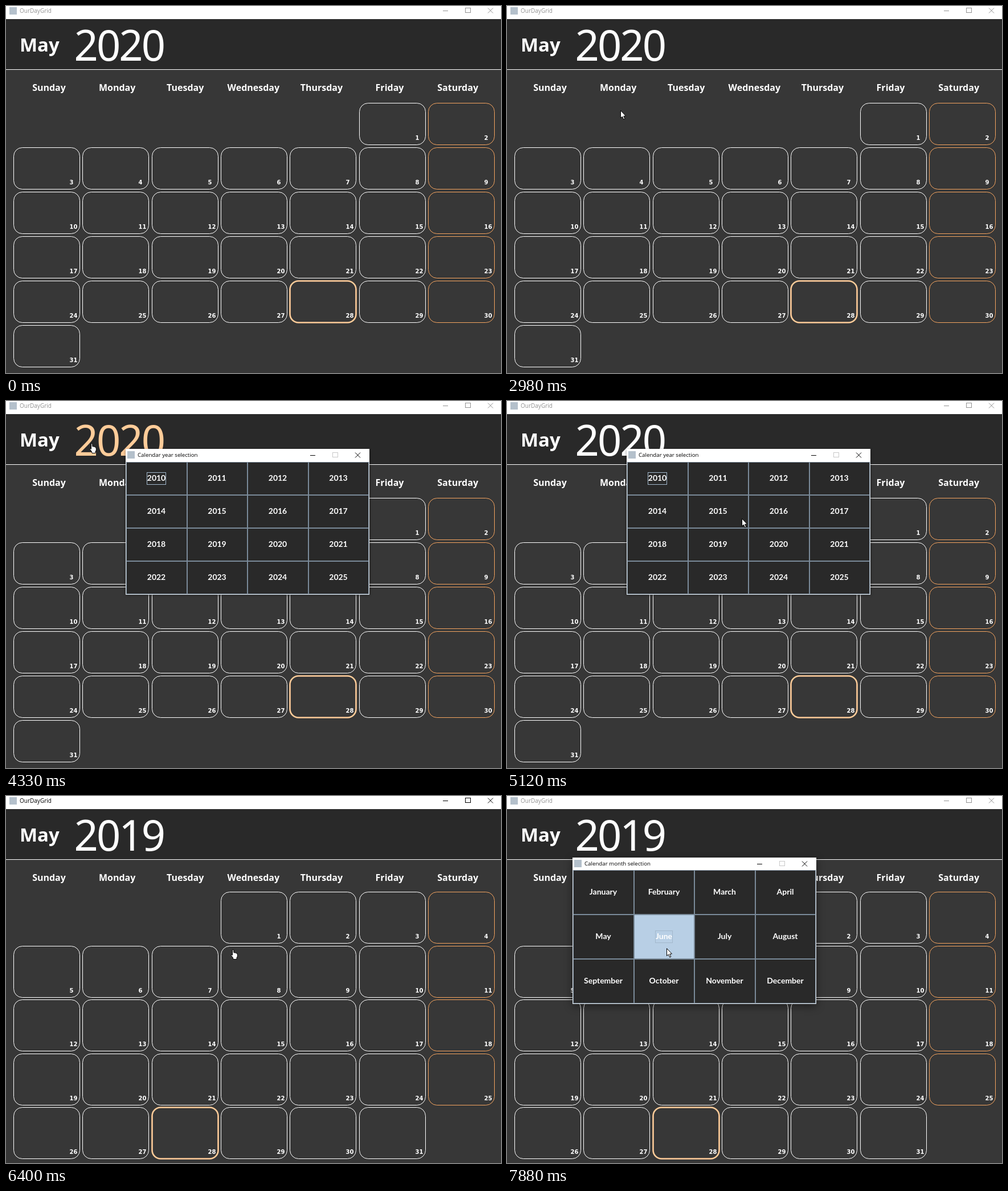
These frames come from a looping animation (869x644 px, 8 s). An HTML page with a canvas:

```html
<!DOCTYPE html>
<html lang="en">
<head>
<meta charset="utf-8">
<title>OurDayGrid</title>
<style>
html, body { margin: 0; width: 100%; height: 100%; overflow: hidden; background: #373737; }
canvas { display: block; }
</style>
</head>
<body>
<canvas id="stage" width="869" height="644"></canvas>
<script>
const ctx = document.getElementById('stage').getContext('2d');
const LOOP = 8000;
const DARK = '#292929', BODY = '#373737', PEACH = '#ffcc99', SAND = '#f4a460';
const STEEL = '#7a8a99', PRESSED = '#b8cfe5', FOCUS = '#a3b8cc', IDLE = '#929292';
const HEAD = '"Noto Sans", "Open Sans", sans-serif';
const UI = '"Open Sans", "Noto Sans", sans-serif';
const DAYS = ['Sunday', 'Monday', 'Tuesday', 'Wednesday', 'Thursday', 'Friday', 'Saturday'];
const MONTHS = ['January', 'February', 'March', 'April', 'May', 'June', 'July', 'August',
  'September', 'October', 'November', 'December'];
const YEARS = Array.from({ length: 16 }, (_, i) => String(2010 + i));

// start, end, steps, target x, target y
const MOVES = [
  [1090, 1140, 2, 706, 640],
  [1600, 1830, 6, 393, 334],
  [2520, 3310, 16, 66, 80],
  [3360, 3870, 11, 146, 69],
  [3900, 4150, 5, 148, 73],
  [4330, 5120, 18, 412, 206],
  [5170, 5810, 13, 407, 274],
  [6400, 6850, 10, 73, 86],
  [7240, 7830, 12, 280, 267]
];

const YEAR_DLG = {
  x: 210, y: 84, top: 107, rowH: 58, h: 256, title: 'Calendar year selection', items: YEARS,
  open: 3950, shown: 4150, close: 5990, gone: 6170, press: 5760, first: 0, pick: 9, blur: 5
};
const MONTH_DLG = {
  x: 115, y: 108, top: 130, rowH: 78, h: 257, title: 'Calendar month selection', items: MONTHS,
  open: 6980, shown: 7190, close: 9000, gone: 9200, press: 7840, first: 4, pick: 5, blur: 14
};
const DIALOGS = [YEAR_DLG, MONTH_DLG];
const DLG_W = 428, COL_W = 106.5;

function text(str, x, y, font, color, align = 'left', spacing = 0) {
  ctx.font = font;
  ctx.fillStyle = color;
  ctx.textAlign = align;
  ctx.letterSpacing = spacing + 'px';
  ctx.fillText(str, x, y);
}

function rect(x, y, w, h, color) {
  ctx.fillStyle = color;
  ctx.fillRect(x, y, w, h);
}

function frame(x, y, w, h, color) {
  ctx.strokeStyle = color;
  ctx.lineWidth = 1;
  ctx.strokeRect(x + .5, y + .5, w, h);
}

function poly(points, x, y) {
  ctx.beginPath();
  points.forEach(([px, py]) => ctx.lineTo(x + px, y + py));
  ctx.closePath();
  ctx.fillStyle = '#fff';
  ctx.strokeStyle = '#000';
  ctx.lineWidth = 1;
  ctx.fill();
  ctx.stroke();
}

const inside = (p, x, y, w, h) => p.x >= x && p.x < x + w && p.y >= y && p.y < y + h;

function pointer(t) {
  let x = 709, y = 646;
  for (const [a, b, n, tx, ty] of MOVES) {
    if (t < a) break;
    const k = Math.min(1, (Math.floor((t - a) / (b - a) * (n - 1) + 1e-6) + 1) / n);
    const e = k * k * (3 - 2 * k);
    x += (tx - x) * e;
    y += (ty - y) * e;
  }
  return { x, y };
}

function monthCells(year) {
  const late = year === 2020;
  const first = late ? 5 : 3, top = late ? 170 : 168;
  const pitch = late ? 78 : 94.5, h = late ? 73 : 90;
  return Array.from({ length: 31 }, (_, i) => {
    const col = (first + i) % 7, row = Math.floor((first + i) / 7);
    return { day: i + 1, col, x: Math.round(13 + 121.3 * col), y: Math.round(top + pitch * row), w: 116, h };
  });
}

function drawCell(c) {
  const today = c.day === 28;
  ctx.beginPath();
  ctx.roundRect(c.x + .5, c.y + .5, c.w, c.h, 15);
  ctx.strokeStyle = today ? PEACH : c.col === 6 ? SAND : '#fff';
  ctx.lineWidth = today ? 2.6 : 1;
  ctx.stroke();
  text(c.day, c.x + 98.5, c.y + c.h - 8, 'bold 10px "DejaVu Sans", sans-serif', '#fff');
}

// x, y: left end of the minimise bar
function windowButtons(x, y, color, boxColor) {
  rect(x, y, 9, 1, color);
  frame(x + 39, y - 5, 9, 8, boxColor);
  ctx.beginPath();
  ctx.moveTo(x + 79, y - 4.5);
  ctx.lineTo(x + 88, y + 4.5);
  ctx.moveTo(x + 88, y - 4.5);
  ctx.lineTo(x + 79, y + 4.5);
  ctx.strokeStyle = color;
  ctx.lineWidth = 1;
  ctx.stroke();
}

function appIcon(x, y) {
  rect(x, y, 13, 13, '#b4c0cb');
}

function drawMain(year, active, overMonth, overYear, cells) {
  const tone = active ? '#000' : IDLE;
  rect(0, 0, 869, 644, BODY);
  rect(0, 0, 869, 23, '#fff');
  appIcon(6, 2);
  text('OurDayGrid', 24, 12, '10px ' + UI, tone);
  windowButtons(767, 8, tone, tone);
  rect(0, 23, 869, 88, DARK);
  rect(0, 111, 869, 1, '#fff');
  text('May', 24, 80, 'bold 33px ' + HEAD, overMonth ? PEACH : '#fff');
  text(year, 119.5, 96, '74px ' + HEAD, overYear ? PEACH : '#fff', 'left', -2.9);
  DAYS.forEach((d, i) => text(d, 75.5 + 119.6 * i, 149, 'bold 16px ' + HEAD, '#fff', 'center'));
  cells.forEach(drawCell);
}

function drawButton(d, i, t) {
  const x = Math.round(d.x + 1 + COL_W * (i % 4));
  const w = Math.round(d.x + 1 + COL_W * (i % 4 + 1)) - x;
  const y = d.top + d.rowH * Math.floor(i / 4);
  const pressed = t >= d.press;
  const focused = i === (pressed ? d.pick : d.first);
  const cx = x + w / 2 - .5, cy = y + d.rowH / 2;
  rect(x, y, w, d.rowH, STEEL);
  rect(x + 1, y + 1, w - 2, d.rowH - 2, focused && pressed ? PRESSED : DARK);
  text(d.items[i], cx, cy + 4, 'bold 14px Lato, "Open Sans", sans-serif', '#fff', 'center');
  if (focused) {
    const tw = Math.round(ctx.measureText(d.items[i]).width);
    frame(Math.round(cx - tw / 2) - 1, cy - 11, tw + 1, 21, FOCUS);
  }
}

function drawDialog(d, t) {
  if (t < d.open || t >= d.gone) return;
  const step = v => Math.min(1, Math.max(0, v));
  const rise = step((t - d.open + 40) / (d.shown - d.open));
  const fall = step((t - d.close) / (d.gone - d.close));
  const alpha = rise * (1 - fall);
  const scale = .9 + .1 * (1 - (1 - rise) ** 2) - .08 * fall;
  const mx = d.x + DLG_W / 2, my = d.y + d.h / 2;
  ctx.save();
  ctx.globalAlpha = alpha;
  ctx.translate(mx, my);
  ctx.scale(scale, scale);
  ctx.translate(-mx, -my);
  ctx.shadowColor = 'rgba(0,0,0,.45)';
  ctx.shadowBlur = d.blur;
  ctx.shadowOffsetY = d.blur / 4;
  rect(d.x, d.y, DLG_W, d.h, '#dde5ec');
  ctx.shadowColor = 'transparent';
  rect(d.x, d.y, DLG_W, d.top - d.y, '#fff');
  appIcon(d.x + 3, d.y + 4);
  text(d.title, d.x + 21, d.y + 14, '9.7px ' + UI, '#000');
  if (t < d.close) windowButtons(d.x + 324, d.y + 11, '#000', '#c8c8c8');
  d.items.forEach((_, i) => drawButton(d, i, t));
  ctx.restore();
}

const ARROW = [[0, 0], [0, 13], [3, 10.5], [5.2, 15.5], [7.3, 14.6], [5.2, 9.8], [9, 9.5]];
const HAND = [[2.5, .5], [4.5, .5], [5, 6], [7, 5.8], [9, 6.6], [11, 7.8], [11.5, 12],
  [10, 15], [10, 17.5], [4, 17.5], [3.5, 15], [.2, 10.5], [.5, 9], [2.5, 10.3]];

function render(t) {
  const p = pointer(t);
  const year = t < YEAR_DLG.close ? 2020 : 2019;
  const active = (t >= 3900 && t < 4000) || (t >= YEAR_DLG.close && t < 7000);
  const cells = monthCells(year);
  const overDialog = DIALOGS.some(d => t >= d.open && t < d.close && inside(p, d.x, d.y, DLG_W, d.h));
  const overMonth = !overDialog && inside(p, 24, 42, 73, 54);
  const overYear = !overDialog && inside(p, 120, 42, 160, 56);
  const overCell = !overDialog && cells.some(c => inside(p, c.x, c.y, c.w, c.h));

  drawMain(year, active, overMonth, overYear, cells);
  DIALOGS.forEach(d => drawDialog(d, t));
  if (t < MOVES[0][0]) return;
  if (overMonth || overYear || overCell) poly(HAND, Math.round(p.x) - 3, Math.round(p.y));
  else poly(ARROW, Math.round(p.x) + .5, Math.round(p.y) + .5);
}

function tick() {
  render(performance.now() % LOOP);
  requestAnimationFrame(tick);
}
tick();
</script>
</body>
</html>
```
